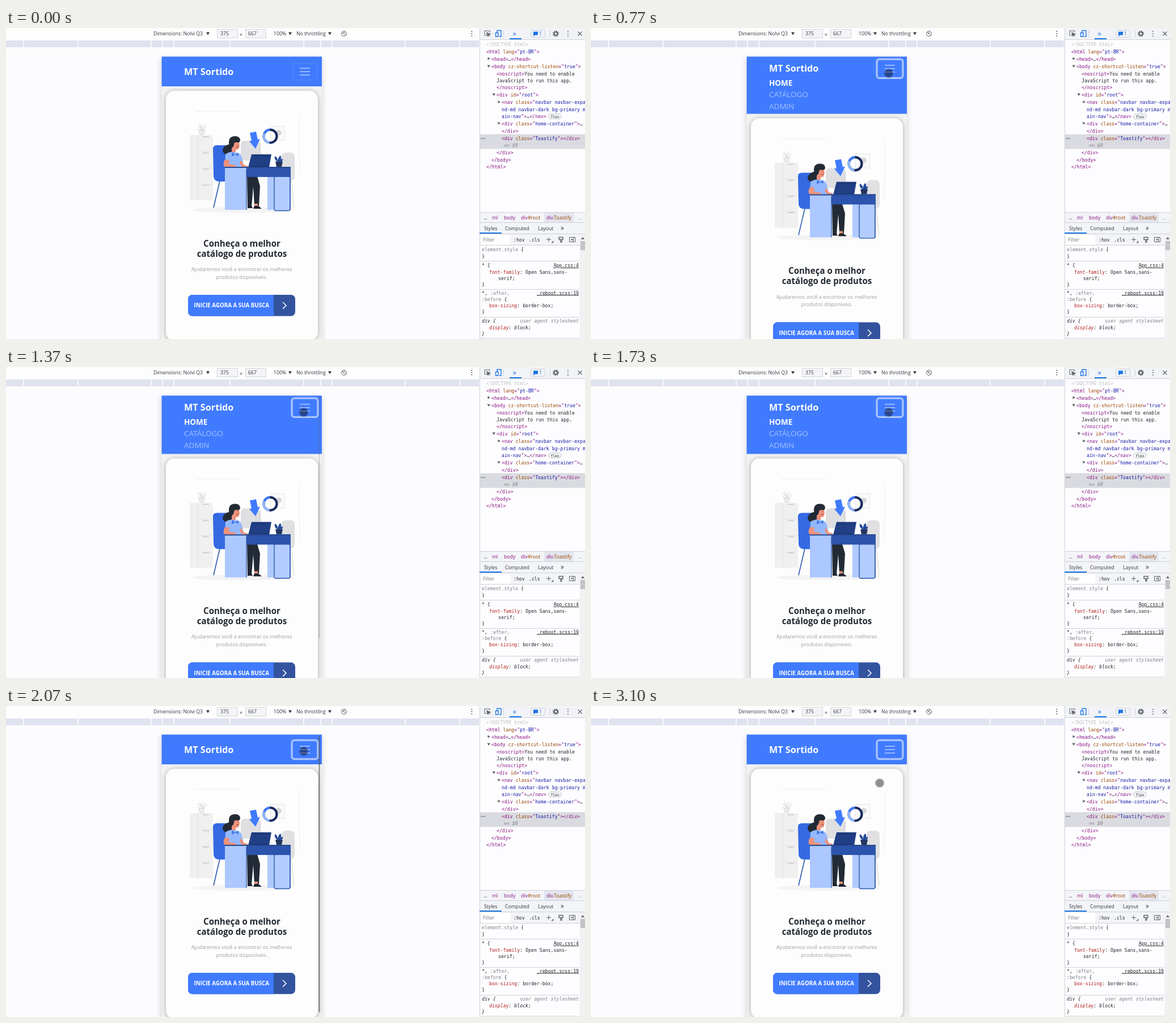
An HTML page that plays this animation: 1021x549 px, repeating every 3130 ms.

```html
<!DOCTYPE html>
<html lang="pt-BR">
<head>
<meta charset="utf-8">
<title>Responsive menu</title>
<style>
  html, body { margin: 0; width: 100%; height: 100%; overflow: hidden; background: #fcfcff; }
  svg { display: block; }
  text { white-space: pre; }
  .app { font-family: "Open Sans", sans-serif; }
  .ui { font: 8.7px "Open Sans", sans-serif; fill: #333740; }
  .code { font: 8.2px "DejaVu Sans Mono", monospace; }
  .bold { font-weight: 700; }
  .mid { text-anchor: middle; }
  .line { fill: none; stroke: #5f6368; }
</style>
</head>
<body>
<svg width="1021" height="549" viewBox="0 0 1021 549">
  <defs>
    <clipPath id="screen"><rect x="274.5" y="50.5" width="282.5" height="501"/></clipPath>
    <clipPath id="menuClip"><rect id="menuArea" x="275" y="86.5" width="282" height="0"/></clipPath>
    <filter id="soft" x="-20%" y="-20%" width="140%" height="140%"><feGaussianBlur stdDeviation="5"/></filter>
  </defs>

  <!-- device toolbar and ruler -->
  <rect width="835" height="21" fill="#fdfdfe"/>
  <rect y="22" width="834" height="12" fill="#dfe2ef"/>
  <path id="ticks" stroke="#fff" stroke-width="1.5"/>
  <g class="ui">
    <text x="260" y="13">Dimensions: Nolvi Q3</text>
    <g fill="#f4f4f8" stroke="#d3d5da"><rect x="372.5" y="2.5" width="36" height="15"/><rect x="422.5" y="2.5" width="36" height="15"/></g>
    <text x="378" y="13">375</text><text x="412" y="14.5">×</text><text x="427" y="13">667</text>
    <text x="472" y="13">100%</text><text x="512" y="13">No throttling</text>
    <path d="M353 7.5h6l-3 5zM498 7.5h6l-3 5zM568 7.5h6l-3 5z"/>
    <path d="M820.5 5h1.6v1.6h-1.6zM820.5 9h1.6v1.6h-1.6zM820.5 13h1.6v1.6h-1.6z"/>
  </g>
  <g class="line"><circle cx="596" cy="10" r="4.5"/><path d="M592.5 7l7 6M594 10l4-3"/></g>

  <!-- phone -->
  <rect x="273" y="53" width="285" height="510" fill="#000" opacity=".15" filter="url(#soft)"/>
  <g clip-path="url(#screen)" class="app">
    <rect x="274" y="50" width="284" height="502" fill="#f3f3f3"/>
    <g id="content">
      <rect x="282" y="112" width="268" height="441" rx="15" opacity=".3" filter="url(#soft)"/>
      <rect x="282" y="111" width="268" height="441" rx="15" fill="#fdfdfd"/>

      <path d="M335 147h77M517.5 151v105" stroke="#ececec" fill="none"/>
      <ellipse cx="418" cy="321" rx="90" ry="5" fill="#f3f3f4"/>
      <g fill="none" stroke="#dededf" stroke-width="1.3">
        <path d="M345 181q-2-8-7-8M345 181q-1-9-4-12M345 181q1-9 5-11M346 181q2-6 8-7M338 178l6 4 8-4"/>
        <path d="M340 181h10l-2 7h-6z" fill="#ededee"/>
      </g>
      <path d="M324 189h41v115h-41z" fill="#f0f0f1"/>
      <path d="M338 189v115M338 218h27M338 247h27M338 276h27" stroke="#e2e2e4"/>
      <path d="M347 192h11M347 220.5h11M347 249h11M347 277.5h11" stroke="#c9c9cb" stroke-width="1.5"/>
      <path d="M466.5 173.5h25v25h-25z" fill="#fafafa" stroke="#e6e6e6"/>
      <circle cx="481" cy="185" r="5" fill="#d6d6d8"/>
      <rect x="414" y="199" width="35" height="35" rx="7" fill="#dfdfe1"/>
      <path d="M448 205v29" stroke="#cfcfd2"/>
      <rect x="486" y="220" width="23" height="50" rx="7" fill="#e0e0e2"/>
      <path d="M503 269l5 48" stroke="#dedee0" stroke-width="1.5"/>

      <path d="M377 270l-11 47" stroke="#2c56ac" stroke-width="1.6"/>
      <path d="M365 213q0-6 7-6h16q7 0 8 8l4 56h-23q-11 0-11-10z" fill="#3469e2"/>
      <path d="M425 262h18l5 17-2 35h-8l-2-34-3 36h-7z" fill="#222a35"/>
      <path d="M438 310h6v6h-6z" fill="#ee927c"/>
      <path d="M438 314l7 0 6 5h-15zM426 314h7l2 4h-9z" fill="#1c222c"/>
      <path d="M394 205q-12 3-12 12 2 7 10 6 8-1 9-9z" fill="#232a34"/>
      <path d="M398 200h13l1 8-2 6-5 1v6l-7-1z" fill="#ee927c"/>
      <path d="M393 202q0-11 11-11 9 0 9 8l-2 3-8 0-2 7-3 3q-5-3-5-10z" fill="#232a34"/>
      <path d="M408 205h1M406 210q2 1 4-1" stroke="#7b3b39" fill="none"/>
      <path d="M387 223q7-5 14-4l10 2q6 4 8 23v3h-33z" fill="#94b8ff"/>
      <path d="M399 219l5 5 5-4 1 6-6-2-6 3z" fill="#3f75df"/>
      <path d="M386 232l8 1-1 7 11 2 4 4h-20q-6-2-4-9zM414 233l6 9 6 1v3h-9l-5-7z" fill="#ee927c"/>
      <path d="M430 185l11-2 3 14 4-1-8 17-11-13 4-1z" fill="#407bff"/>
      <g fill="none" stroke-width="4.2" transform="rotate(-90 466 191)">
        <circle cx="466" cy="191" r="11.5" stroke="#172a5c"/>
        <circle cx="466" cy="191" r="11.5" stroke="#91b5ff" pathLength="100" stroke-dasharray="30 70" stroke-dashoffset="-52"/>
        <circle cx="466" cy="191" r="11.5" stroke="#407bff" pathLength="100" stroke-dasharray="17 83" stroke-dashoffset="-82"/>
      </g>
      <path d="M433 223h35l-4 23h-37z" fill="#203f85"/>
      <path d="M436 226h29M429 244h35" stroke="#173063"/>
      <path d="M480 237q-8-4-6-11 6 3 6 11q-1-9 4-12 4 7-3 12 2-6 7-6 1 5-6 7" fill="#244a9b"/>
      <path d="M475 236h13l-2 9h-9z" fill="#24365f"/>
      <path d="M461 262h12v59h-12z" fill="#b0caff"/>
      <rect x="473" y="262" width="28" height="60.5" rx="3" fill="#b3ccff" stroke="#2b59ae" stroke-width="1.4"/>
      <path d="M422 245h80v18h-80z" fill="#2c54ad"/>
      <path d="M386 246h38v75h-38z" fill="#acc8ff"/>
      <path d="M386 246h116" stroke="#264891" stroke-width="2"/>
      <path d="M424 249v72M501 249v72" stroke="#2d56a9" stroke-width="1.3"/>

      <g class="mid">
        <g class="bold" font-size="15.05" fill="#232a31">
          <text x="416" y="385.5">Conheça o melhor</text><text x="416" y="403.5">catálogo de produtos</text>
        </g>
        <g font-size="9.05" fill="#9e9e9e">
          <text x="415.7" y="429">Ajudaremos você a encontrar os melhores</text><text x="415.7" y="442.5">produtos disponíveis.</text>
        </g>
      </g>
      <rect x="321" y="471" width="189" height="37.5" rx="7.5" fill="#33539f"/>
      <path d="M472 471H328.5a7.5 7.5 0 0 0-7.5 7.5v22.5a7.5 7.5 0 0 0 7.5 7.5H472z" fill="#407bff"/>
      <text x="331.5" y="493.2" class="bold" font-size="9.77" fill="#fff">INICIE AGORA A SUA BUSCA</text>
      <path d="M488 484l6 5.8-6 5.8" fill="none" stroke="#fff" stroke-width="1.5"/>
    </g>

    <rect id="nav" x="274" y="50" width="284" height="53" fill="#407bff"/>
    <g id="navRow">
      <text x="314" y="82.7" class="bold" font-size="16.2" fill="#fff">MT Sortido</text>
      <rect x="506" y="62.3" width="42" height="29.5" rx="3" fill="none" stroke="#fff" stroke-opacity=".12"/>
      <rect id="ring" fill="none" stroke="#fff"/>
      <path d="M518 71h18M518 77h18M518 83h18" stroke="#fff" stroke-opacity=".6" stroke-width="1.4"/>
    </g>
    <g clip-path="url(#menuClip)" font-size="13.5" fill="#fff">
      <text x="314" y="102" class="bold">HOME</text>
      <g fill-opacity=".52"><text x="314" y="122.3">CATÁLOGO</text><text x="314" y="142.5">ADMIN</text></g>
    </g>
    <rect id="scrollbar" x="551.3" y="52" width="2.4" rx="1.2" fill="#555"/>
    <g id="touch"><circle r="8.3" fill-opacity=".26"/><circle r="6.8" fill-opacity=".24"/></g>
  </g>

  <!-- inspector -->
  <rect x="835" width="186" height="549" fill="#fdfdff"/>
  <rect x="835" width="186" height="20" fill="#f1f3f6"/>
  <rect x="835" y="187.5" width="186" height="26" fill="#dadbe0"/>
  <rect x="835" y="325" width="186" height="58" fill="#f3f4f8"/>
  <rect x="949" y="326" width="52" height="17" fill="#e3e5ee"/>
  <rect x="837" y="365" width="52" height="18" fill="#fff"/>
  <rect x="1011.5" y="365" width="10" height="184" fill="#f1f1f4"/>
  <rect x="1013" y="376" width="8" height="16" fill="#c1c2c6"/>
  <path d="M1014 373l3-4 3 4z" fill="#666"/>
  <path d="M835.5 0v549M835 20.5h186M835 325.5h186M835 343.5h186M835 363.5h186M835 383.5h186M835 411.5h176M835 461.5h176M835 510.5h176M835 547.5h176M877.5 4v12M959.5 4v12" class="line" style="stroke:#cfd1d7"/>
  <path d="M835 362h39M888 19h21" stroke="#1a73e8" stroke-width="2"/>
  <path d="M849.5 51.5l4.5 2.5-4.5 2.5zM848.5 65.5h5.5l-2.7 4.5zM857.5 115.5h5.5l-2.7 4.5zM867.5 128l4.5 2.5-4.5 2.5zM867.5 165.5l4.5 2.5-4.5 2.5z" fill="#5f6368"/>
  <rect x="956.5" y="151.5" width="23" height="9" rx="4.5" fill="#f1f3f4" stroke="#c6c9ce"/>

  <g class="line">
    <path d="M851 13h-7V5h9v3"/><path d="M847.5 8l2.5 7 1.5-3 3-1zM851 12l3 3" fill="#5f6368"/>
    <path d="M866 8V4.5h7V15h-3M863.5 8.5h4.5V15h-4.5z" stroke="#1a73e8" stroke-width="1.3"/>
    <rect x="925.5" y="3.5" width="25" height="13" rx="2" stroke="#cfd1d7"/>
    <path d="M930 6.5h8v6h-5l-3 2z" fill="#1a73e8" stroke="none"/>
    <circle cx="969.5" cy="10" r="3" stroke-width="2.2"/><circle cx="969.5" cy="10" r="4.8" stroke-width="1.5" stroke-dasharray="1.9 1.87"/>
    <path d="M991 5v1.6M991 9.2v1.6M991 13.4v1.6" stroke-width="1.8"/>
    <path d="M1008.5 6.5l7 7M1015.5 6.5l-7 7" stroke-width="1.3"/>
    <path d="M953 373.5h8M957 369.5v8M962 379h3v-3z"/>
    <path d="M975 369.5h7v4h-7zM978 374v4h2v-4" stroke-width="1.4"/>
    <path d="M993.5 369.5h10v8h-10zM1000.5 369.5v8"/><path d="M999 371.5v4l-3-2z" fill="#5f6368" stroke="none"/>
  </g>
  <g class="ui">
    <text x="940" y="13" style="fill:#1a73e8">1</text>
    <text x="893.5" y="14" style="font-size:13px;fill:#1a73e8">»</text>
    <text x="843" y="357">Styles</text><text x="880" y="357">Computed</text><text x="938" y="357">Layout</text>
    <text x="978" y="357" style="font-size:12px">»</text>
    <text x="841" y="377" style="fill:#73777d">Filter</text>
  </g>
  <g id="code" class="code"></g>
</svg>

<script>
const $ = id => document.getElementById(id);
const set = (id, attrs) => { for (const k in attrs) $(id).setAttribute(k, attrs[k]); };

$('ticks').setAttribute('d', [31, 127, 256, 276, 296, 395, 525, 555, 575, 704, 800].map(x => `M${x} 22v12`).join(''));

// Each run is a colour letter followed by its text; runs are split by "|".
const colours = { t: '#881280', a: '#994500', v: '#1a1aa6', k: '#24262b', g: '#7d8087', d: '#c0c0c4', p: '#b3201c' };
function code(x, y, runs, style = '') {
  const text = document.createElementNS('http://www.w3.org/2000/svg', 'text');
  text.setAttribute('x', x);
  text.setAttribute('y', y + 3);
  text.setAttribute('style', style);
  for (const run of runs.split('|')) {
    const span = document.createElementNS('http://www.w3.org/2000/svg', 'tspan');
    span.setAttribute('fill', colours[run[0]]);
    span.textContent = run.slice(1);
    text.append(span);
  }
  $('code').append(text);
}

const italic = 'font-style:italic';
const right = 'text-anchor:end;';
const link = right + 'text-decoration:underline';
const ui = 'font:8.7px "Open Sans",sans-serif';
[
  [847, 29, 'd<!DOCTYPE html>'],
  [847, 41.5, 't<html |alang|t="|vpt-BR|t">'],
  [856, 54.5, 't<head>|k…|t</head>'],
  [856, 67.5, 't<body |acz-shortcut-listen|t="|vtrue|t">'],
  [865, 80.5, 't<noscript>|kYou need to enable'],
  [865, 93, 'kJavaScript to run this app.'],
  [865, 105, 't</noscript>'],
  [865, 118, 't<div |aid|t="|vroot|t">'],
  [874, 131, 't<nav |aclass|t="|vnavbar navbar-expa'],
  [874, 143.5, 'vnd-md navbar-dark bg-primary m'],
  [874, 156, 'vain-nav|t">|k…|t</nav>'],
  [874, 169, 't<div |aclass|t="|vhome-container|t">|k…'],
  [874, 181.5, 't</div>'],
  [874, 194.5, 't<div |aclass|t="|vToastify|t"></div>'],
  [837, 193, 'g…', 'font-size:14px'],
  [878, 206.5, 'g== $0', italic],
  [865, 220, 't</div>'],
  [856, 232.5, 't</body>'],
  [847, 245, 't</html>'],
  [960.5, 155.5, 'kflex', 'font-size:6.3px'],
  [842, 334.5, 'k…', ui], [857, 334.5, 'tml', ui], [878, 334.5, 'tbody', ui],
  [908, 334.5, 'tdiv|a#root', ui], [953, 334.5, 'tdiv|a.Toastify', ui], [1008, 334.5, 'g…', ui],
  [895, 373.5, 'k:hov'], [922, 373.5, 'k.cls'],
  [839, 391, 'gelement.style |k{'], [839, 403, 'k}'],
  [839, 419, 'k* {'], [1010, 419, 'kApp.css:4', link],
  [852, 431, 'pfont-family|k: Open Sans,sans-'], [868, 441.5, 'kserif;'], [839, 452.5, 'k}'],
  [839, 467.5, 'k*, |g:after,'], [1010, 467.5, 'k_reboot.scss:19', link],
  [839, 478.5, 'g:before |k{'], [852, 490, 'pbox-sizing|k: border-box;'], [839, 501, 'k}'],
  [839, 517, 'kdiv {', italic], [1010, 517, 'guser agent stylesheet', right + italic],
  [852, 529, 'pdisplay|k: block;', italic], [839, 539.5, 'k}', italic]
].forEach(args => code(...args));

const LOOP = 3130, OPEN = 527, CLOSE = 1764, COLLAPSE = 315;
const progress = (t, start, length) => Math.min(1, Math.max(0, (t - start) / length));
const smooth = p => p * p * (3 - 2 * p);

// CSS "ease": cubic-bezier(.25, .1, .25, 1)
function ease(x) {
  let low = 0, high = 1, s;
  for (let i = 0; i < 20; i++) {
    s = (low + high) / 2;
    if (.75 * s * (1 - s) + s ** 3 < x) low = s; else high = s;
  }
  return .3 * s * (1 - s) ** 2 + 3 * s * s * (1 - s) + s ** 3;
}

function draw(t) {
  const menu = 61 * (ease(progress(t, OPEN, COLLAPSE)) - ease(progress(t, CLOSE, COLLAPSE)));
  const slack = Math.max(0, 10.5 - menu);
  const bottom = 92.5 + menu + slack;
  set('nav', { height: bottom - 50 });
  set('menuArea', { height: menu });
  set('navRow', { transform: `translate(0 ${slack / 2 - 5.25})` });
  set('content', { transform: `translate(0 ${bottom - 103})` });

  const focus = smooth(progress(t, OPEN, 150)), w = 3 * focus;
  set('ring', {
    x: 505.5 - w / 2, y: 61.8 - w / 2, width: 43 + w, height: 30.5 + w, rx: 3 + w / 2,
    'stroke-width': w, 'stroke-opacity': .58 * focus
  });

  const closing = t >= CLOSE && t < CLOSE + COLLAPSE;
  const flash = t >= OPEN + COLLAPSE && t < CLOSE ? 1 - progress(t, 1165, 300) : 0;
  set('scrollbar', { height: 470 - (bottom - 118) * 1.24, opacity: .6 * (closing ? 1 : flash) });

  const arrive = smooth(progress(t, 30, 240)), leave = smooth(progress(t, 2130, 330));
  set('touch', {
    transform: `translate(${556 - 31 * arrive - 16 * leave} ${112 - 32 * arrive + 56 * leave})`,
    opacity: t < 30 ? 0 : 1
  });
}

function frame() {
  draw(performance.now() % LOOP);
  requestAnimationFrame(frame);
}
frame();
</script>
</body>
</html>
```
